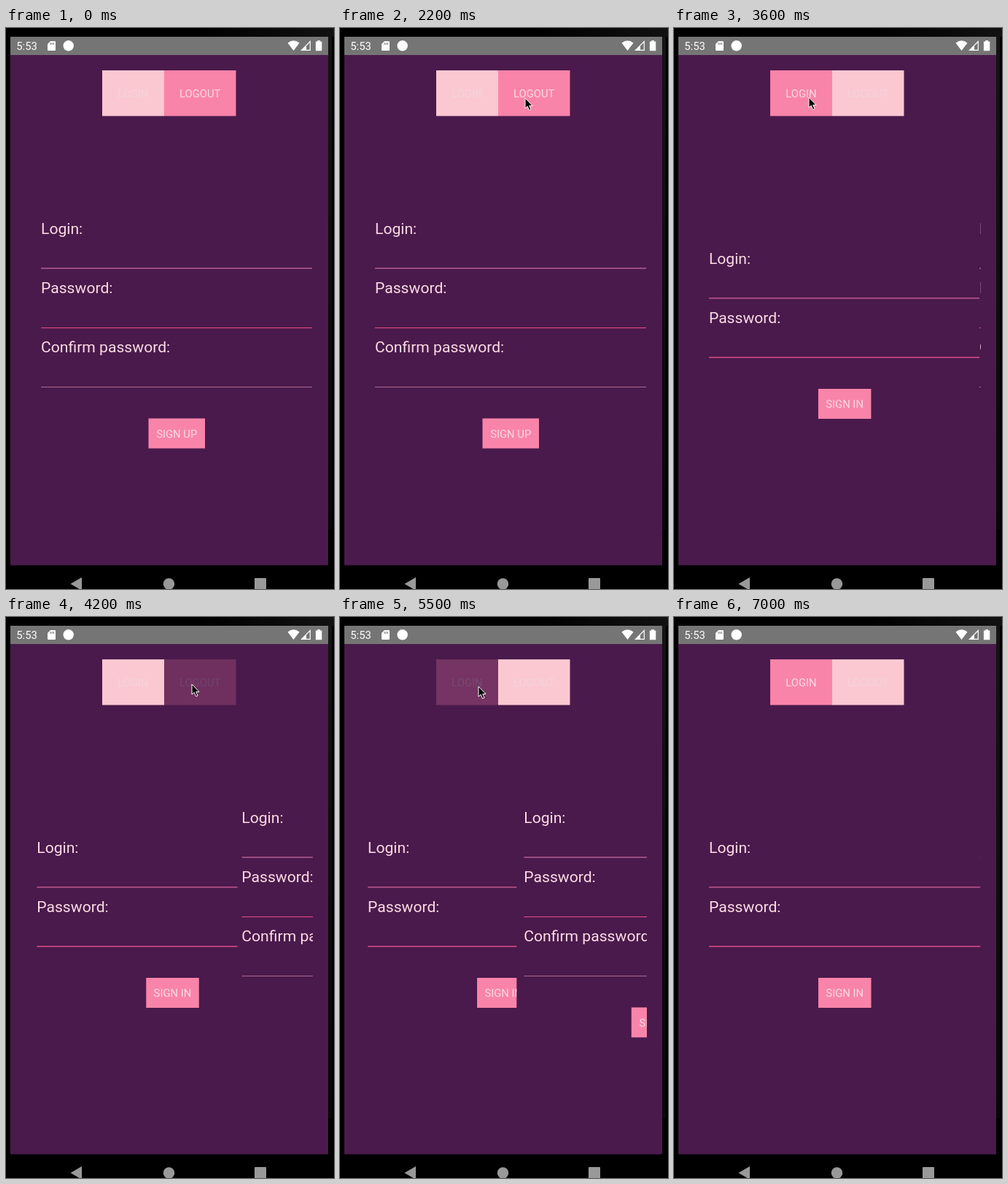
These frames come from a looping animation (450x768 px, 7.4 s). An HTML page:

```html
<!DOCTYPE html>
<html lang="en">
<head>
<meta charset="utf-8">
<title>Login form</title>
<style>
  html, body { margin: 0; width: 100%; height: 100%; overflow: hidden; background: #000; }
  svg { display: block; width: 450px; height: 768px; font-family: Roboto, "Liberation Sans", sans-serif; }
  .label { font-size: 21.14px; fill: #fcdce4; }
  .button { font-size: 14.8px; fill: #fbdbe3; text-anchor: middle; }
  .box { fill: #f984a9; }
  .off .box { fill: #fbc8d2; }
  .off .button { fill: #f3d3da; }
</style>
</head>
<body>
<svg viewBox="0 0 450 768">
  <defs>
    <linearGradient id="topShade"><stop offset="0" stop-color="#000"/><stop offset="1" stop-color="#111"/></linearGradient>
    <linearGradient id="sideShade" x2="0" y2="1"><stop offset="0" stop-color="#141414"/><stop offset="1" stop-color="#080808"/></linearGradient>
    <clipPath id="screen"><rect x="6" y="37" width="436" height="699"/></clipPath>
    <clipPath id="inClip"><rect y="200" height="450"/></clipPath>
    <clipPath id="upClip"><rect y="200" height="450"/></clipPath>
  </defs>

  <rect width="450" height="768"/>
  <rect x="265" width="185" height="12" fill="url(#topShade)"/>
  <rect x="442" y="12" width="5" height="674" fill="url(#sideShade)"/>
  <rect x="6" y="37" width="436" height="698.5" fill="#4a1a4c"/>

  <!-- status bar -->
  <rect x="6" y="12" width="436" height="25" fill="#757575"/>
  <g fill="#fff">
    <text x="14.3" y="30" font-size="14.8">5:53</text>
    <path d="M61 18h6q1 0 1 1v11q0 1-1 1h-9q-1 0-1-1V22z"/>
    <path d="M61 20v3m2.2-3v3m2.2-3v3" stroke="#757575"/>
    <circle cx="85.7" cy="24.3" r="7.2"/>
    <path d="M386.5 20.5Q394.500 14 402.500 20.500L394.500 31z"/>
    <path d="M417.300 18.500V30.300H405.500z" fill="none" stroke="#fff" stroke-width="1.200"/>
    <path d="M412 24V30.500H405.500z"/>
    <path d="M427.300 17h3.600v1.500h2.400v12.700h-8.400V18.500h2.400z"/>
  </g>

  <!-- navigation bar -->
  <g fill="#999">
    <path d="M88.500 761L104 752V770z"/>
    <circle cx="223.500" cy="761" r="7.700"/>
    <rect x="341" y="753" width="16" height="16" rx="1"/>
  </g>

  <g id="login">
    <rect class="box" x="132" y="58" width="85" height="62.500"/>
    <text class="button" x="174.500" y="95">LOGIN</text>
  </g>
  <g id="logout">
    <rect class="box" x="217" y="58" width="98.500" height="62.500"/>
    <text class="button" x="266.200" y="95">LOGOUT</text>
  </g>

  <g clip-path="url(#screen)">
    <g clip-path="url(#inClip)"><g id="signIn">
      <text class="label" x="48" y="322.500">Login:</text>
      <rect x="48" y="369.200" width="372.500" height="1.300" fill="#d2609a"/>
      <text class="label" x="48" y="403.500">Password:</text>
      <rect x="48" y="450.200" width="372.500" height="1.500" fill="#e04c88"/>
      <rect class="box" x="198" y="494" width="72.500" height="41"/>
      <text class="button" x="234.200" y="520.300">SIGN IN</text>
    </g></g>
    <g clip-path="url(#upClip)"><g id="signUp">
      <text class="label" x="48" y="282">Login:</text>
      <rect x="48" y="328.500" width="372" height="1" fill="#e87fb0"/>
      <text class="label" x="48" y="363">Password:</text>
      <rect x="48" y="410" width="372" height="1" fill="#ee4d88"/>
      <text class="label" x="48" y="444">Confirm password:</text>
      <rect x="48" y="491" width="372" height="1" fill="#ad6892"/>
      <rect class="box" x="195.500" y="534.500" width="77.500" height="41"/>
      <text class="button" x="234.200" y="561">SIGN UP</text>
    </g></g>
  </g>

  <path id="cursor" d="M0 0V14L3.200 11.200L5.600 16.700L8 15.600L5.700 10.400H10z" stroke="#fff"/>
</svg>

<script>
const LOOP = 7400, STEP = 100;
const LEFT = 48, WIDTH = 372.5, GAP = 22;
const SPRING_MS = 700, PRESS_MS = 150, RELEASE_MS = 220;

const $ = id => document.getElementById(id);
const inClip = document.querySelector('#inClip rect');
const upClip = document.querySelector('#upClip rect');

// release time, button, page that follows
const taps = [
  [1900, 'logout', 'up'],
  [3040, 'login', 'in'],
  [4180, 'logout', 'up'],
  [5462, 'login', 'in']
];

// time, x, y of the pointer tip
const path = [
  [100, 328, 330], [500, 275, 262], [800, 242, 210], [1000, 233, 183],
  [1400, 266, 90], [1700, 254, 96], [2400, 254, 96], [2700, 184, 95],
  [3600, 185, 95], [3700, 190, 95], [4000, 255, 92], [4800, 255, 92],
  [5200, 190, 95], [6300, 190, 95], [6600, 138, -22]
];

const easeInOut = u => u < .5 ? 2 * u * u : 1 - 2 * (1 - u) ** 2;

function spring(u) {
  if (u >= 1) return 1;
  return 1 + 2 ** (-10 * u) * Math.sin((u - .1) * 5 * Math.PI);
}

function opacity(t, name) {
  for (const [at, button] of taps) {
    const d = t - at;
    if (button !== name || d < -PRESS_MS || d > RELEASE_MS) continue;
    return d < 0 ? 1 - .8 * easeInOut(1 + d / PRESS_MS)
                 : .2 + .8 * easeInOut(d / RELEASE_MS);
  }
  return 1;
}

function pageState(t) {
  let page = 'up', share = 1;
  for (const [at, , next] of taps) {
    if (t < at) break;
    if (next === page) continue;
    page = next;
    const s = spring((t - at) / SPRING_MS);
    share = page === 'up' ? s : 1 - s;
  }
  return { page, share };
}

function place(group, clip, x, width) {
  group.setAttribute('transform', `translate(${x - LEFT} 0)`);
  clip.setAttribute('x', x);
  clip.setAttribute('width', Math.max(0, width));
}

function moveCursor(t) {
  const shown = t >= path[0][0] && t < path[path.length - 1][0];
  $('cursor').style.display = shown ? '' : 'none';
  if (!shown) return;
  const i = path.findIndex(p => p[0] > t);
  const [t0, x0, y0] = path[i - 1], [t1, x1, y1] = path[i];
  const u = (t - t0) / (t1 - t0);
  $('cursor').setAttribute('transform', `translate(${x0 + (x1 - x0) * u} ${y0 + (y1 - y0) * u})`);
}

function draw(t) {
  const { page, share } = pageState(t);
  place($('signIn'), inClip, LEFT - GAP * share, WIDTH * (1 - share));
  place($('signUp'), upClip, LEFT + WIDTH * (1 - share), WIDTH * share + .5);
  $('login').setAttribute('class', page === 'up' ? 'off' : '');
  $('logout').setAttribute('class', page === 'in' ? 'off' : '');
  for (const name of ['login', 'logout']) $(name).style.opacity = opacity(t, name);
  moveCursor(t);
}

const start = performance.now();
function tick() {
  const t = (performance.now() - start) % LOOP;
  draw(Math.floor(t / STEP) * STEP);
  requestAnimationFrame(tick);
}
draw(0);
requestAnimationFrame(tick);
</script>
</body>
</html>
```
